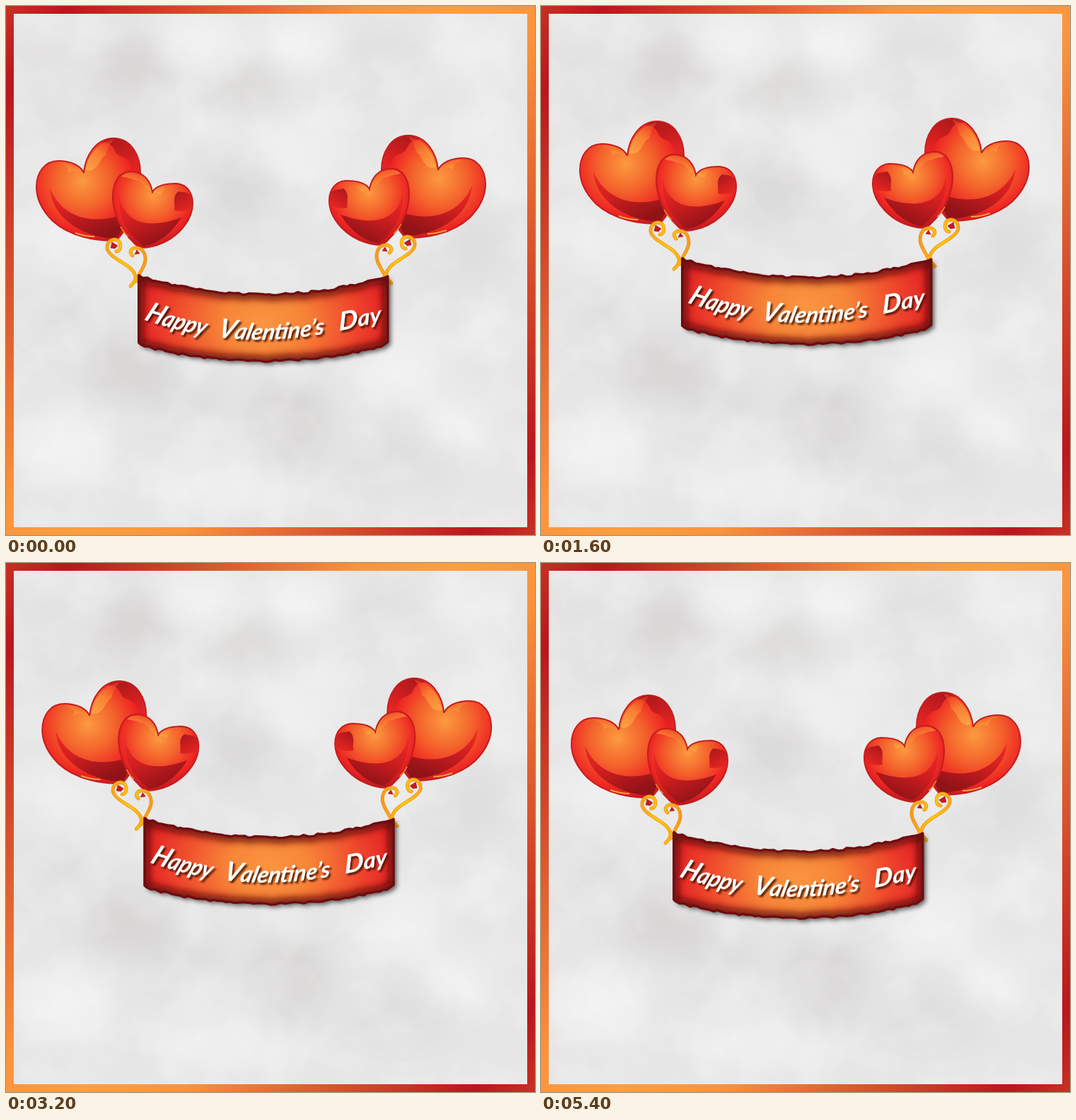
Write an HTML page that moves like this. It is 748x748 px and loops after 5600 ms.

```html
<!DOCTYPE html>
<html lang="en">
<head>
<meta charset="utf-8">
<title>Happy Valentine's Day</title>
<style>
  html, body { margin: 0; width: 100%; height: 100%; overflow: hidden; }
  svg { position: absolute; left: 0; top: 0; width: 100vw; height: 100vh; }
  #backdrop { will-change: transform; }
  text { font: italic 700 32px Lato, "Open Sans", sans-serif; }
  .cap { font-size: 37px; }
</style>
</head>
<body>
<svg id="backdrop" viewBox="0 0 748 748">
  <defs>
    <linearGradient id="frame" gradientUnits="userSpaceOnUse" x1="374" y1="374" x2="8" y2="114" spreadMethod="reflect">
      <stop offset="0" stop-color="#ff9f40"/>
      <stop offset=".25" stop-color="#fa943d"/>
      <stop offset="1" stop-color="#ba161d"/>
    </linearGradient>
    <filter id="soft" filterUnits="userSpaceOnUse" x="-80" y="-80" width="908" height="908">
      <feGaussianBlur stdDeviation="20"/>
    </filter>
    <filter id="mist" filterUnits="userSpaceOnUse" x="0" y="0" width="748" height="748" color-interpolation-filters="sRGB">
      <feTurbulence type="fractalNoise" baseFrequency=".014" numOctaves="4" seed="8"/>
      <feColorMatrix values="0 0 0 0 1  0 0 0 0 1  0 0 0 0 1  1.6 0 0 0 -.6"/>
    </filter>
    <clipPath id="paper"><rect x="11" y="11" width="726" height="726"/></clipPath>
  </defs>
  <rect width="748" height="748" fill="url(#frame)"/>
  <g clip-path="url(#paper)">
    <rect width="748" height="748" fill="#e7e6e6"/>
    <g id="clouds" filter="url(#soft)"></g>
    <rect width="748" height="748" filter="url(#mist)" opacity=".4"/>
  </g>
</svg>

<svg id="stage" viewBox="0 0 748 748">
  <defs>
    <radialGradient id="bigFill" gradientUnits="userSpaceOnUse" cx="108" cy="248" r="98">
      <stop offset="0" stop-color="#fb9a40"/>
      <stop offset=".38" stop-color="#f4652c"/>
      <stop offset=".72" stop-color="#ee2423"/>
      <stop offset="1" stop-color="#b9181d"/>
    </radialGradient>
    <radialGradient id="smallFill" gradientUnits="userSpaceOnUse" cx="208" cy="268" r="74">
      <stop offset="0" stop-color="#fb9a40"/>
      <stop offset=".4" stop-color="#f4622c"/>
      <stop offset=".75" stop-color="#ee2423"/>
      <stop offset="1" stop-color="#b9181d"/>
    </radialGradient>
    <linearGradient id="shade" x1="0" y1="0" x2=".6" y2="1">
      <stop offset="0" stop-color="#ef2b24"/>
      <stop offset=".45" stop-color="#d21e20"/>
      <stop offset="1" stop-color="#8f1317"/>
    </linearGradient>
    <linearGradient id="gloss" x1="0" y1="1" x2=".7" y2="0">
      <stop offset="0" stop-color="#ffb04a" stop-opacity=".75"/>
      <stop offset=".6" stop-color="#fb8a35" stop-opacity=".75"/>
      <stop offset="1" stop-color="#f0502a" stop-opacity=".5"/>
    </linearGradient>
    <linearGradient id="lobe" x1="0" y1="0" x2=".5" y2="1">
      <stop offset="0" stop-color="#a9161b"/>
      <stop offset="1" stop-color="#e32422"/>
    </linearGradient>
    <linearGradient id="gold" gradientUnits="userSpaceOnUse" x1="142" y1="0" x2="198" y2="0">
      <stop offset="0" stop-color="#f7a51c"/>
      <stop offset=".45" stop-color="#ffcb08"/>
      <stop offset="1" stop-color="#f5981f"/>
    </linearGradient>
    <radialGradient id="ribbonFill" gradientUnits="userSpaceOnUse" cx="0" cy="0" r="1" gradientTransform="translate(364 448) scale(190 150)">
      <stop offset="0" stop-color="#fa9540"/>
      <stop offset=".3" stop-color="#f78538"/>
      <stop offset=".7" stop-color="#ee432b"/>
      <stop offset=".88" stop-color="#e62a27"/>
      <stop offset="1" stop-color="#c51f22"/>
    </radialGradient>
    <filter id="glow" filterUnits="userSpaceOnUse" x="160" y="350" width="410" height="190">
      <feGaussianBlur stdDeviation="6"/>
    </filter>
    <filter id="cast" filterUnits="userSpaceOnUse" x="160" y="350" width="410" height="190">
      <feDropShadow dx="4" dy="4" stdDeviation="3" flood-color="#000" flood-opacity=".6"/>
    </filter>
    <filter id="textCast" filterUnits="userSpaceOnUse" x="160" y="380" width="410" height="130">
      <feDropShadow dx="2.5" dy="3" stdDeviation="1.2" flood-color="#3a0805" flood-opacity=".85"/>
    </filter>
    <clipPath id="ribbonClip"><path class="ribbon"/></clipPath>
    <path id="baseline" d="M186 442 C250 462 300 472 364 472 C430 471 485 457 550 440"/>

    <g id="balloons">
      <path fill="url(#bigFill)" stroke="#c41d1f" stroke-width="2" d="M110 236 C112 211 128 187 152 187 C176 187 190 210 190 236 C190 272 176 310 157 331 C130 334 90 326 66 304 C50 288 43 272 43 256 C43 236 54 219 74 219 C92 219 106 226 110 236Z"/>
      <path fill="url(#shade)" d="M62 258 C76 292 112 312 162 296 C170 302 163 322 156 329 C114 328 66 304 62 258Z"/>
      <path fill="url(#lobe)" d="M136 193 C158 194 148 208 164 213 C176 217 178 229 180 238 L189 240 C190 208 176 188 152 188 Q143 188 136 193Z"/>
      <path fill="url(#gloss)" d="M113 232 C116 209 133 191 152 189 C146 197 143 201 141 211 C133 212 130 238 113 232Z"/>
      <path fill="url(#gloss)" d="M75 222 C92 221 104 227 109 238 C99 233 94 230 88 236 C90 229 86 224 75 222Z"/>
      <path fill="none" stroke="#fba03d" stroke-width="2" d="M98 321 Q112 326 125 326"/>

      <path fill="url(#smallFill)" stroke="#c41d1f" stroke-width="2" d="M207 263 C212 254 226 251 240 251 C256 252 264 264 264 279 C264 304 240 334 202 341 C192 343 186 341 180 334 C163 318 151 294 151 270 C151 248 161 233 178 234 C194 235 204 246 207 263Z"/>
      <path fill="url(#shade)" d="M160 268 C166 304 196 318 248 299 C234 322 214 337 194 339 C174 324 158 302 160 268Z"/>
      <path fill="url(#lobe)" d="M263 270 C258 262 250 264 244 262 C234 270 240 280 238 289 C248 292 255 287 263 288Z"/>
      <path fill="url(#gloss)" d="M178 236 C192 237 203 249 206 263 C196 264 195 245 182 246 C178 244 172 242 163 241 Q169 235 178 236Z"/>
      <path fill="url(#gloss)" d="M208 263 C216 254 228 253 238 253 C226 256 222 260 219 267Z"/>
      <path fill="none" stroke="#f5812f" stroke-width="1.6" d="M162 312 Q168 322 173 326"/>

      <g fill="none" stroke="#ee9018" stroke-linecap="round" stroke-width="5">
        <path id="longCord" d="M156 347 C163 347 164 334 157 331 C150 328 142 334 143 343 C146 355 167 362 176 371 C184 379 187 386 176 396"/>
        <path id="shortCord" d="M179 353 C174 349 176 342 184 342 C194 342 197 351 197 359 C196 371 187 378 184 389"/>
      </g>
      <g fill="none" stroke="url(#gold)" stroke-linecap="round" stroke-width="3.4">
        <use href="#longCord"/><use href="#shortCord"/>
      </g>
      <path fill="#c9191f" stroke="#8f1317" stroke-width=".6" d="M150 334 L158 339 L154 343 L148 342Z M185 345 L189 350 L182 351Z"/>
    </g>
  </defs>

  <g id="banner">
    <use href="#balloons"/>
    <use href="#balloons" transform="translate(721 -4) scale(-1 1)"/>
    <path class="ribbon" fill="url(#ribbonFill)" filter="url(#cast)"/>
    <g clip-path="url(#ribbonClip)">
      <path class="ribbon" fill="none" stroke="#5d0709" stroke-width="13" filter="url(#glow)"/>
    </g>
    <path class="ribbon" fill="none" stroke="#700a0d" stroke-width="3" stroke-linejoin="round"/>
    <g filter="url(#textCast)">
      <g fill="#fff" transform="translate(97.8 0) skewX(-12)">
        <text><textPath href="#baseline" startOffset="5"><tspan class="cap">H</tspan>appy</textPath></text>
        <text><textPath href="#baseline" startOffset="117"><tspan class="cap">V</tspan>alentine’s</textPath></text>
        <text><textPath href="#baseline" startOffset="289"><tspan class="cap">D</tspan>ay</textPath></text>
      </g>
    </g>
  </g>
</svg>

<script>
const STEP = 200, STEPS = 28;

// x, y, rx, ry, opacity; positive is a dark patch, negative a light one
const patches = [
  [180, 85, 60, 42, .5], [340, 105, 60, 45, .35], [55, 60, 50, 40, .2],
  [520, 75, 80, 30, .25], [330, 265, 60, 45, .4], [110, 150, 70, 25, .2],
  [400, 590, 55, 60, .55], [170, 510, 65, 45, .5], [250, 560, 60, 35, .3],
  [650, 340, 60, 50, .25], [560, 640, 80, 40, .25], [70, 440, 50, 40, .25],
  [280, 50, 60, 40, -.6], [420, 55, 60, 40, -.6], [660, 60, 60, 45, -.4],
  [85, 625, 65, 50, -.6], [300, 680, 90, 35, -.5], [565, 500, 60, 50, -.5],
  [640, 590, 55, 45, -.4], [90, 340, 60, 50, -.35], [420, 200, 70, 50, -.4],
  [690, 190, 40, 60, -.35]
];
document.getElementById('clouds').innerHTML = patches.map(([x, y, rx, ry, o]) =>
  `<ellipse cx="${x}" cy="${y}" rx="${rx}" ry="${ry}" fill="${o > 0 ? '#cbc8c7' : '#fafafc'}" opacity="${Math.abs(o)}"/>`
).join('');

let seed = 17;
const random = () => (seed = seed * 16807 % 2147483647) / 2147483647;

// Sagging edge with small torn bites
function tornEdge(left, right, y, sag) {
  const points = [];
  for (let x = left; x <= right; x += 4 + random() * 4) {
    const u = (x - left) / (right - left) * 2 - 1;
    points.push([x, y + sag * (1 - u * u) + (random() - .5) * 3]);
  }
  return points;
}
const top_ = tornEdge(188, 540, 382, 26);
const bottom = tornEdge(191, 537, 480, 22).reverse();
const ribbon = 'M' + [[187.5, 382], ...top_, [540, 382], [540, 475], ...bottom, [187.5, 476]]
  .map(p => p.map(v => v.toFixed(1)).join(' ')).join('L') + 'Z';
document.querySelectorAll('.ribbon').forEach(path => path.setAttribute('d', ribbon));

// Rises to the peak, then drifts down slowly and finally faster
function offset(step) {
  if (step <= 9) return [1.5 * step, -3 * step];
  return [.75 * (27 - step), step <= 18 ? step - 36 : 2 * (step - 27)];
}

const banner = document.getElementById('banner');
const start = performance.now();
function draw(now) {
  const step = Math.floor(Math.max(0, now - start) / STEP) % STEPS;
  banner.setAttribute('transform', `translate(${offset(step)})`);
  requestAnimationFrame(draw);
}
draw(start);
</script>
</body>
</html>
```
